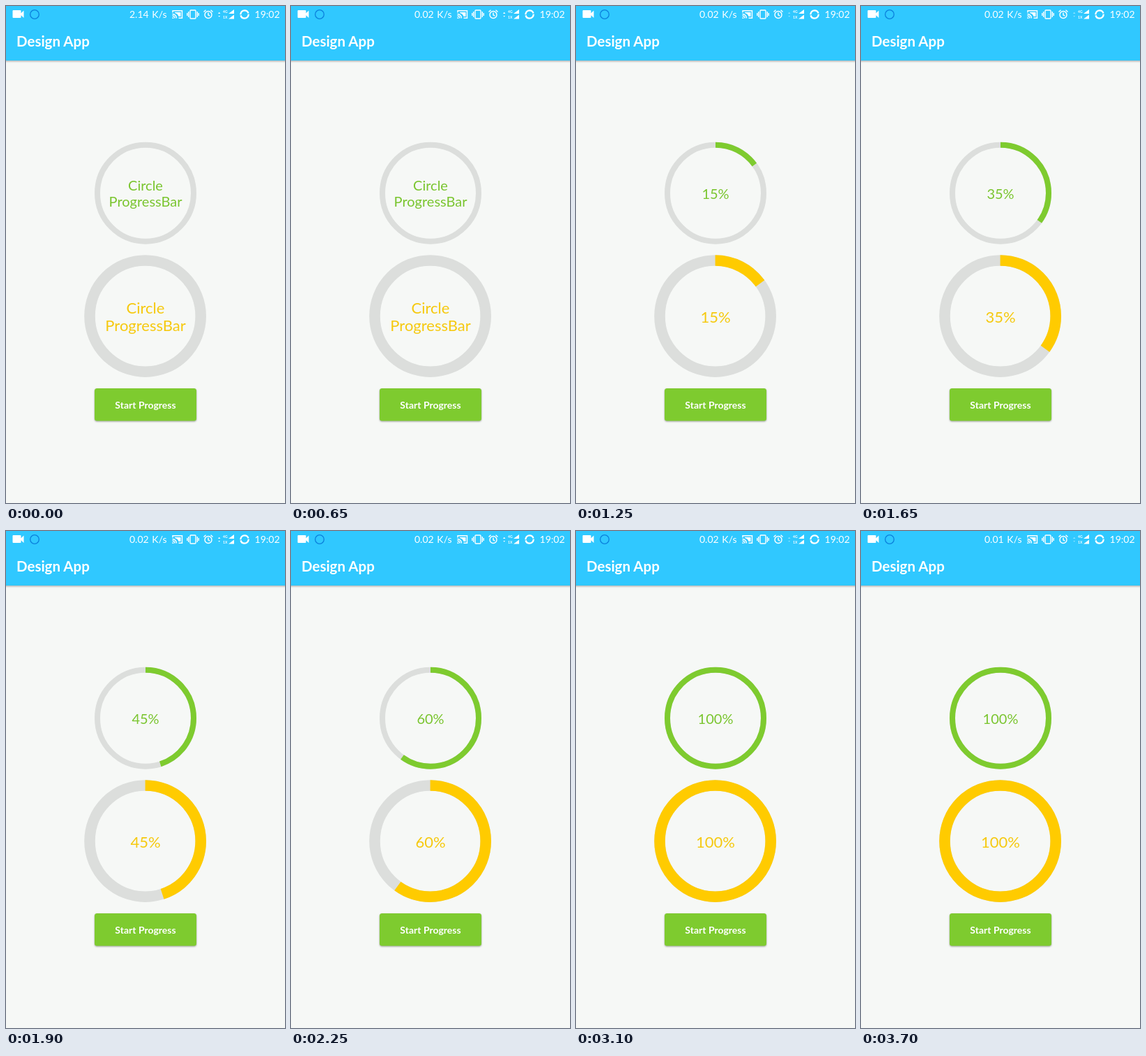
These frames come from a looping animation (400x711 px, 4250 ms). An HTML page:

```html
<!DOCTYPE html>
<html lang="en">
<head>
<meta charset="utf-8">
<title>Circle progress</title>
<style>
  html, body { margin: 0; width: 100%; height: 100%; overflow: hidden; background: #f6f8f6; }
  svg { display: block; width: 100%; height: 100%; }
  text { font-family: Lato, "Open Sans", sans-serif; }
  .status { font-size: 14px; fill: #fff; }
  .tiny { font-size: 5px; font-weight: 700; fill: #fff; }
  .line { fill: none; stroke: #fff; stroke-width: 1.4; }
  .ring { fill: none; }
  .track { stroke: #dcdedc; }
  .green { font-size: 20px; fill: #7ac52f; }
  .yellow { font-size: 22px; fill: #f6c90f; }
  .mid { text-anchor: middle; }
  .bold { font-weight: 700; fill: #fff; }
  #bar { filter: drop-shadow(0 1px 1.5px rgba(0, 0, 0, .35)); }
</style>
</head>
<body>
<svg viewBox="0 0 400 711" preserveAspectRatio="none">
  <rect width="400" height="711" fill="#f6f8f6"/>
  <rect id="bar" x="-6" y="-6" width="412" height="84" fill="#30c8ff"/>

  <g id="icons">
    <path fill="#fff" d="M10.5 6h10q1 0 1 1v3.3l4-3.8v10.500l-4-3.800v2.800q0 1-1 1h-10q-1 0-1-1v-9q0-1 1-1z"/>
    <circle cx="41" cy="12" r="6.300" fill="none" stroke="#0b80dc" stroke-width="1.300"/>
    <g class="line">
      <path d="M239 9.500V6.700h13.500v10.600h-5M238.500 11.500a6 6 0 0 1 6 6M238.500 14a3.500 3.500 0 0 1 3.500 3.500"/>
      <rect x="264" y="6" width="8" height="12" rx="1"/>
      <path d="M261.700 8v8M274.300 8v8M259.800 10v4M276.200 10v4"/>
      <circle cx="290" cy="12.500" r="5"/>
      <path d="M290 9.500v3.300l2.300 1.400M283.500 8.500l3-2.700M296.500 8.500l-3-2.700"/>
      <circle cx="342" cy="12" r="5.700" stroke-width="2.300" stroke-dasharray="16 1.200"/>
    </g>
    <path fill="#fff" d="M242 9h8.500v6h-3q-1-4-5.500-5zM238.500 16a2 2 0 0 1 2 2h-2zM327 5v6h-8zM327 12.500v6h-8z"/>
    <text class="tiny" x="311" y="10">4G</text>
    <text class="tiny" x="311" y="17.500">1X</text>
    <g id="traffic" fill="#fff">
      <path d="M304 11l1.700-2.300L307.400 11z"/>
      <path d="M304.400 14h2.600l-1.300 1.800z"/>
    </g>
  </g>
  <text id="speed" class="status" x="177" y="17"></text>
  <text class="status" x="230.500" y="17" text-anchor="end">K/s</text>
  <text class="status" x="392.500" y="17" text-anchor="end">19:02</text>
  <text class="bold" x="15" y="58" font-size="20.500">Design App</text>

  <g id="dials"></g>

  <rect id="button" x="127" y="547" width="146" height="46.500" rx="3.500" fill="#7ecb2f"/>
  <text class="bold mid" x="200" y="575.500" font-size="14">Start Progress</text>
</svg>
<script>
const LOOP = 4250;
const byId = id => document.getElementById(id);

// Each table lists [start ms, value].
const progress = [[0, -1], [900, 0], [1000, 5], [1100, 10]];
const addRun = (start, first, last) => {
  for (let p = first; p <= last; p += 5) progress.push([start + (p - first) * 20, p]);
};
addRun(1250, 15, 40);
addRun(1900, 45, 60);
addRun(2350, 65, 85);
addRun(2900, 90, 100);
const speeds = [[0, "2.14"], [650, "0.02"], [3700, "0.01"]];
const traffic = [[0, 1], [1100, .45], [1800, 1], [2900, .45]];
const lifts = [[0, 0], [800, .4], [850, .8], [900, 1], [950, .5], [1000, 0]];

const at = (table, t) => table.findLast(([start]) => start <= t)[1];

function makeDial({ cx, cy, r, width, color, name, lines, base }) {
  const ring = `cx="${cx}" cy="${cy}" r="${r}" stroke-width="${width}"`;
  const group = document.createElementNS("http://www.w3.org/2000/svg", "g");
  group.innerHTML = `
    <circle class="ring track" ${ring}/>
    <circle class="ring arc" ${ring} stroke="${color}" pathLength="100" transform="rotate(-90 ${cx} ${cy})"/>
    <g class="label">
      <text class="mid ${name}" x="200" y="${lines[0]}">Circle</text>
      <text class="mid ${name}" x="200" y="${lines[1]}">ProgressBar</text>
    </g>
    <text class="mid ${name} value" x="200" y="${base}"></text>`;
  byId("dials").append(group);
  const [arc, label, value] = [".arc", ".label", ".value"].map(s => group.querySelector(s));
  return p => {
    const idle = p < 0;
    arc.style.display = p > 0 ? "" : "none";
    arc.setAttribute("stroke-dasharray", `${Math.max(p, 0)} 100`);
    label.style.display = idle ? "" : "none";
    value.textContent = idle ? "" : p + "%";
  };
}

const dials = [
  makeDial({ cx: 200, cy: 267.7, r: 69, width: 8, color: "#7ecb2f", name: "green", lines: [264, 287], base: 275.5 }),
  makeDial({ cx: 199.6, cy: 443.6, r: 79.6, width: 15.6, color: "#ffcb00", name: "yellow", lines: [440, 465], base: 452.5 })
];

function draw(t) {
  const p = at(progress, t);
  dials.forEach(show => show(p));
  byId("speed").textContent = at(speeds, t);
  byId("traffic").setAttribute("opacity", at(traffic, t));
  const lift = at(lifts, t);
  byId("button").style.filter =
    `drop-shadow(0 ${1 + 3 * lift}px ${1.2 + 1.8 * lift}px rgba(0, 0, 0, .36))`;
}

const begin = performance.now();
function tick() {
  draw((performance.now() - begin) % LOOP);
  requestAnimationFrame(tick);
}
tick();
</script>
</body>
</html>
```
